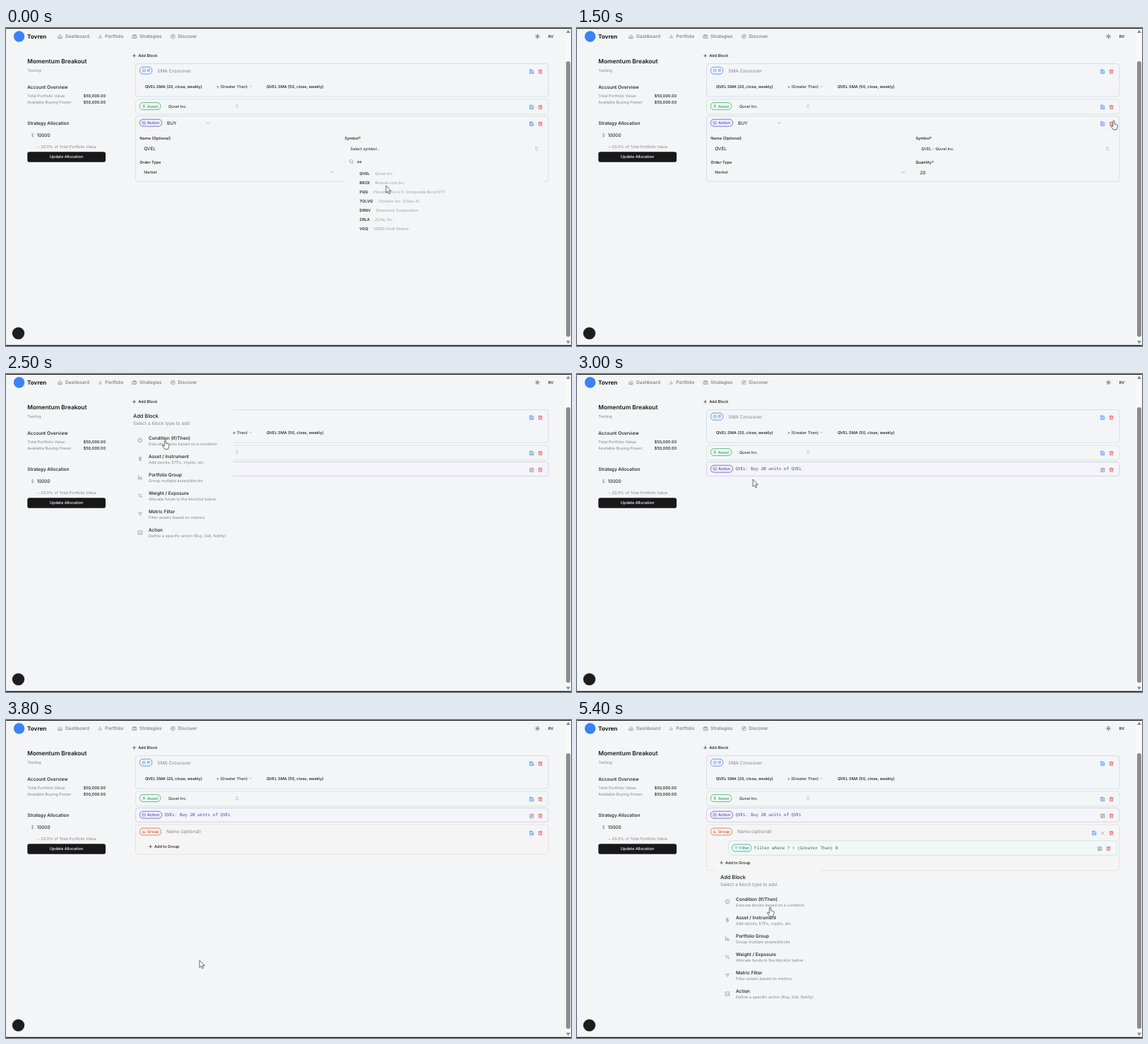
An HTML page that plays this animation: 800 px wide and 450 px high, repeating every 5.5 s.

```html
<!DOCTYPE html>
<html lang="en">
<head>
<meta charset="utf-8">
<title>Strategy builder</title>
<style>
  html, body { margin: 0; width: 100%; height: 100%; overflow: hidden; background: #f4f5f7; }
  svg { display: block; width: 100vw; height: 100vh; text-rendering: geometricPrecision; }
  text { font-family: Inter, sans-serif; white-space: pre; }
  .mono { font-family: "Noto Sans Mono", monospace; }
</style>
</head>
<body>
<svg id="stage" viewBox="0 0 800 450"></svg>
<script>
const LOOP = 5500, STEP = 100;
const PAGE = '#f4f5f7', INK = '#18181b', MUTED = '#85858b', FAINT = '#a0a0a5';
const BLUE = '#3b82f6', RED = '#e5484d';
const XS = 5.6, SM = 6.5, MD = 7.4, LG = 8.35;

// Icon outlines on a 24 unit grid
const ring = 'M2 12a10 10 0 1 0 20 0a10 10 0 1 0-20 0';
const ICONS = {
  save: 'M4 3h12l5 5v12a1 1 0 0 1-1 1H4a1 1 0 0 1-1-1V4a1 1 0 0 1 1-1zM7 3v5h8M7 21v-8h10v8',
  trash: 'M3 6h18M5 6v15h14V6M8 6V3h8v3M10 11v6M14 11v6',
  edit: 'M12 4H3v17h17v-9M18 3l3 3-9 9-4 1 1-4z',
  down: 'M6 9l6 6 6-6',
  upDown: 'M7 15l5 5 5-5M7 9l5-5 5 5',
  plus: 'M4 12h16M12 4v16',
  close: 'M5 5l14 14M19 5L5 19',
  search: 'M21 21l-4.5-4.5M3 11a8 8 0 1 0 16 0a8 8 0 1 0-16 0',
  condition: ring + 'M12 7v5M12 16v1',
  dollar: 'M12 2v20M17 5H9.5a3.5 3.5 0 0 0 0 7h5a3.5 3.5 0 0 1 0 7H6',
  group: 'M3 3v18h18M8 17v-4M13 17V8M18 17v-3',
  percent: 'M19 5L5 19M4 6.5a2.5 2.5 0 1 0 5 0a2.5 2.5 0 1 0-5 0M15 17.5a2.5 2.5 0 1 0 5 0a2.5 2.5 0 1 0-5 0',
  filter: 'M3 6h18M7 12h10M10 18h4',
  action: 'M3 3h18v18H3zM8 8l3 3-3 3M13 15h4',
  home: 'M3 10l9-7 9 7v11H3zM9 21v-9h6v9',
  bars: 'M6 20v-4M12 20V4M18 20V10',
  bag: 'M2 7h20v13H2zM8 7V3h8v4M8 7v13M16 7v13',
  compass: ring + 'M16 8l-2 6-6 2 2-6z',
  sun: 'M8 12a4 4 0 1 0 8 0a4 4 0 1 0-8 0M12 2v2M12 20v2M2 12h2M20 12h2M5 5l1 1M18 18l1 1M5 19l1-1M18 6l1-1'
};

const ASSETS = [
  ['QVEL', 'Quvel Inc.'], ['BRZK', 'Brazuk.com Inc.'],
  ['PQG', 'Ploven Core U.S. Composite Bond ETF'], ['TOLVQ', 'Tolvenix Inc. (Class A)'],
  ['DRNV', 'Drennovic Corporation'], ['ZRLA', 'Zurla, Inc.'], ['VGQ', 'VQND Gold Shares']
];
const [TICKER, COMPANY] = ASSETS[0];

const BLOCK_TYPES = [
  ['condition', 'Condition (If/Then)', 'Execute blocks based on a condition'],
  ['dollar', 'Asset / Instrument', 'Add stocks, ETFs, crypto, etc.'],
  ['group', 'Portfolio Group', 'Group multiple assets/blocks'],
  ['percent', 'Weight / Exposure', 'Allocate funds to the block(s) below'],
  ['filter', 'Metric Filter', 'Filter assets based on metrics'],
  ['action', 'Action', 'Define a specific action (Buy, Sell, Notify)']
];

// Pointer path: time, x, y, hand shape from this time on
const POINTER = [
  [0, 538, 223, 0], [100, 538, 223, 0], [300, 512, 206, 0], [400, 512, 206, 0],
  [700, 488, 203, 0], [1000, 490, 204, 0], [1300, 758, 134, 0], [1400, 758, 134, 0],
  [1500, 760, 131, 1], [1600, 746, 133, 1], [1700, 740, 140, 0], [2000, 560, 330, 0],
  [2200, 366, 8, 0], [2400, 202, 38, 1], [2600, 249, 149, 1], [2700, 249, 149, 0],
  [3300, 249, 149, 0], [3500, 220, 185.5, 1], [3700, 268, 334, 1], [3800, 274, 340, 0],
  [4600, 274, 340, 0], [4900, 220, 200, 1], [5000, 220, 200, 1], [5100, 240, 240, 1],
  [5300, 270, 363, 1], [5400, 273.5, 265, 1]
];

// y is the middle of the capitals
function text(x, y, str, { size = XS, weight = 400, fill = INK, anchor = 'start', cls = '' } = {}) {
  return `<text x="${x}" y="${y + size * 0.36}" font-size="${size}" font-weight="${weight}" fill="${fill}" text-anchor="${anchor}" class="${cls}">${str}</text>`;
}
const bold = (x, y, str, more) => text(x, y, str, { weight: 500, ...more });
const muted = (x, y, str, more) => text(x, y, str, { fill: MUTED, ...more });
const mono = (x, y, str, fill) => text(x, y, str, { size: 6, fill, cls: 'mono' });

function icon(name, x, y, color = MUTED, size = 7) {
  return `<path transform="translate(${x - size / 2} ${y - size / 2}) scale(${size / 24})" d="${ICONS[name]}" fill="none" stroke="${color}" stroke-width="2.2" stroke-linecap="round" stroke-linejoin="round"/>`;
}

function box(x, y, w, h, fill, { stroke = 'none', r = 0, line = 0.9 } = {}) {
  return `<rect x="${x}" y="${y}" width="${w}" height="${h}" rx="${r}" fill="${fill}" stroke="${stroke}" stroke-width="${line}"/>`;
}
const disc = (x, y, r, fill) => `<circle cx="${x}" cy="${y}" r="${r}" fill="${fill}"/>`;
const card = (y, bottom, stroke, fill = PAGE, x = 183.5, right = 768) =>
  box(x, y, right - x, bottom - y, fill, { stroke, r: 3.5 });

function badge(x, y, w, name, label, color, fill) {
  return box(x, y - 5, w, 10, fill, { stroke: color, r: 4.6, line: 0.7 }) +
    icon(name, x + 6, y, color, 5) + bold(x + 10.6, y, label, { fill: color });
}

const saveTrash = y => icon('save', 744.3, y, BLUE) + icon('trash', 756.6, y, RED);
const editTrash = (x, y) => icon('edit', x, y, '#666') + icon('trash', x + 12.1, y, RED);

function header() {
  const links = [['home', 76.5, 'Dashboard', 84], ['bars', 133, 'Portfolio', 140.3],
    ['bag', 182, 'Strategies', 189], ['compass', 236.3, 'Discover', 243.3]];
  return disc(18.6, 12, 7.7, BLUE) +
    text(30, 12, 'Tovren', { size: 8.1, weight: 700 }) +
    links.map(([name, x, label, tx]) => icon(name, x, 12) + bold(tx, 12, label, { size: SM, fill: '#77777d' })).join('') +
    icon('sun', 752.5, 12, INK) + bold(767.8, 12, 'RV');
}

function sidebar() {
  const right = { anchor: 'end' };
  return text(30.3, 47.2, 'Momentum Breakout', { size: LG, weight: 600 }) +
    muted(30.3, 60, 'Testing') +
    bold(30.3, 84, 'Account Overview', { size: SM }) +
    muted(30.3, 96, 'Total Portfolio Value:') + bold(141, 96, '$50,000.00', right) +
    muted(30.3, 105.3, 'Available Buying Power:') + bold(141, 105.3, '$50,000.00', right) +
    bold(30.3, 134.2, 'Strategy Allocation', { size: SM }) +
    muted(35.5, 152, '$', { size: SM }) + text(43.5, 152, '10000', { size: SM }) +
    muted(44, 167.6, '~ 20.0% of Total Portfolio Value') +
    box(30.3, 175.3, 110.7, 14.4, INK, { r: 2.8 }) +
    bold(85.6, 182.3, 'Update Allocation', { fill: '#fff', anchor: 'middle' });
}

function frameEdges() {
  return box(792, 1, 8, 448, '#f9f9fa') + box(793, 47, 6, 390, '#8c8c8e', { r: 3 }) +
    '<path d="M793 7l3-4.5 3 4.5zM793 442.5l3 4.5 3-4.5z" fill="#8c8c8e"/>' +
    box(0, 0, 800, 1, '#111') + box(0, 448.7, 800, 1.3, '#111') +
    disc(17.5, 432, 9.3, '#d9d9dc') + disc(17.5, 432, 8.6, '#1d1d1f');
}

function conditionBlock() {
  return card(50.5, 97, '#cfdcee', '#f3f5f8') +
    badge(189.3, 60.2, 17.5, 'condition', 'If', '#3f6fd8', '#eef3fc') +
    muted(214.3, 60.2, 'SMA Crossover', { size: SM }) +
    bold(197, 82.6, TICKER + ' SMA (20, close, weekly)') +
    text(298, 82.6, '&gt; (Greater Than)') + icon('down', 346, 82.8, MUTED, 5.5) +
    bold(369, 82.6, TICKER + ' SMA (50, close, weekly)') + saveTrash(61.7);
}

function assetBlock() {
  return card(101, 121.8, '#cfe9de', '#f3f6f6') +
    badge(189.3, 110.6, 29.5, 'dollar', 'Asset', '#2f9e62', '#eef8f2') +
    text(230, 110.6, COMPANY) + icon('upDown', 327.2, 110.8) + saveTrash(112);
}

function actionBlock(collapsed, quantity) {
  const tag = badge(189.3, 134.2, 31.3, 'action', 'Action', '#4f46b8', '#efeffa');
  if (collapsed) {
    return card(124.5, 144.4, '#cfd0ec', '#f4f4f9') + tag +
      mono(224.4, 134.2, `${TICKER}: Buy 20 units of ${TICKER}`, '#4a4398') + editTrash(744.5, 135.6);
  }
  return card(124.5, 217.4, '#d2dcea') + tag +
    box(184, 144.3, 583.5, 0.5, '#e9ebf0') +
    text(228, 134.2, 'BUY', { size: SM }) + icon('down', 286.4, 134.5) + saveTrash(135.6) +
    bold(189.3, 156.2, 'Name (Optional)') + text(195.2, 170.6, TICKER, { size: SM }) +
    bold(189.3, 189.6, 'Order Type') + text(195.2, 204.1, 'Market') + icon('down', 462, 204.2) +
    bold(479.5, 156.2, 'Symbol*') + icon('upDown', 751, 170.7) +
    bold(479.5, 189.6, 'Quantity*') + text(485.6, 204.4, quantity, { size: SM });
}

function assetPicker() {
  return box(480, 178.5, 282, 116, PAGE) + icon('search', 489.2, 189) + text(497, 189, 'aa') +
    ASSETS.map(([ticker, name], i) => bold(500.6, 206 + 13.05 * i,
      `${ticker}<tspan dx="7.5" font-weight="400" fill="${FAINT}">${name}</tspan>`)).join('');
}

function groupBlock(hasFilter) {
  const addY = hasFilter ? 202 : 179.2;
  let out = card(148, addY + 10.9, '#f0ddd0', '#f6f5f5') +
    badge(189.3, 158, 30.3, 'group', 'Group', '#c4553a', '#fcf2ee') +
    muted(227, 157.7, 'Name (optional)', { size: SM }) +
    icon('plus', 204.6, addY, INK, 6.5) + bold(210, addY, 'Add to Group');
  if (!hasFilter) return out + saveTrash(160);
  return out + icon('save', 732.3, 160, BLUE) + icon('close', 744.4, 160) + icon('trash', 756.6, 160, RED) +
    card(170.8, 191.3, '#bfe9e1', '#f3f7f7', 214.4, 764) +
    badge(219.5, 181, 27.3, 'filter', 'Filter', '#2a9080', '#ecf8f5') +
    mono(250.8, 181, 'Filter where ? &gt; (Greater Than) 0', '#3c6660') + editTrash(740.4, 182);
}

function blockMenu(dx, buttonY) {
  const items = BLOCK_TYPES.map(([name, title, note], i) => {
    const y = 51 + 26.1 * i;
    return icon(name, 213, y + 3.7) + bold(225, y, title, { size: SM }) + muted(225, y + 8.3, note);
  });
  return `<g transform="translate(${dx} ${buttonY})">` + box(197, 8.5, 147.5, 190, PAGE) +
    bold(203, 20.2, 'Add Block', { size: MD }) +
    muted(203, 30, 'Select a block type to add', { size: SM }) + items.join('') + '</g>';
}

function pointer(t) {
  const i = POINTER.findLastIndex(key => key[0] <= t);
  const [t0, x0, y0, hand] = POINTER[i];
  const [t1, x1, y1] = POINTER[i + 1] || [LOOP, x0, y0];
  const k = (t - t0) / (t1 - t0);
  const shape = hand
    ? 'M-1.1 1.2a1.1 1.1 0 0 1 2.2 0V4.8l3.3.7q1.2.4 1.1 1.8l-.6 3-.9 2.5H-1L-3.8 8.5q-.6-1 .3-1.3.8-.3 2.4 1.4Z'
    : 'M0 0V10.3L2.4 8.2 4 11.8 5.7 11 4.2 7.5H7.3Z';
  return `<path transform="translate(${x0 + (x1 - x0) * k} ${y0 + (y1 - y0) * k})" d="${shape}" fill="#fafafa" stroke="#444" stroke-width=".8" stroke-linejoin="round"/>`;
}

function render(t) {
  const between = (from, to) => t >= from && t < to;
  const picking = t < 300, hasFilter = t >= 4600;
  const quantity = '20'.slice(0, t < 700 ? 0 : t < 800 ? 1 : 2);
  let out = box(0, 0, 800, 450, PAGE) + header() + sidebar() +
    icon('plus', 181.6, 39.2, INK, 6.5) + bold(187.2, 39.2, 'Add Block') +
    conditionBlock() + assetBlock() + actionBlock(t >= 1700, quantity);
  if (t < 1700) out += text(487.6, 170.6, picking ? 'Select symbol...' : `${TICKER} - ${COMPANY}`);
  if (picking) out += assetPicker();
  if (t >= 3300) out += groupBlock(hasFilter);
  if (between(2400, 2700)) out += blockMenu(-23, 39.2);
  if (between(3500, 3800)) out += blockMenu(0, 179);
  if (t >= 5000) out += blockMenu(0, 202.2);
  return out + frameEdges() + pointer(t);
}

const stage = document.getElementById('stage');
const start = performance.now();
let shown = -1;
function tick() {
  const t = Math.floor((performance.now() - start) % LOOP / STEP) * STEP;
  if (t !== shown) stage.innerHTML = render(shown = t);
  requestAnimationFrame(tick);
}
tick();
</script>
</body>
</html>
```
